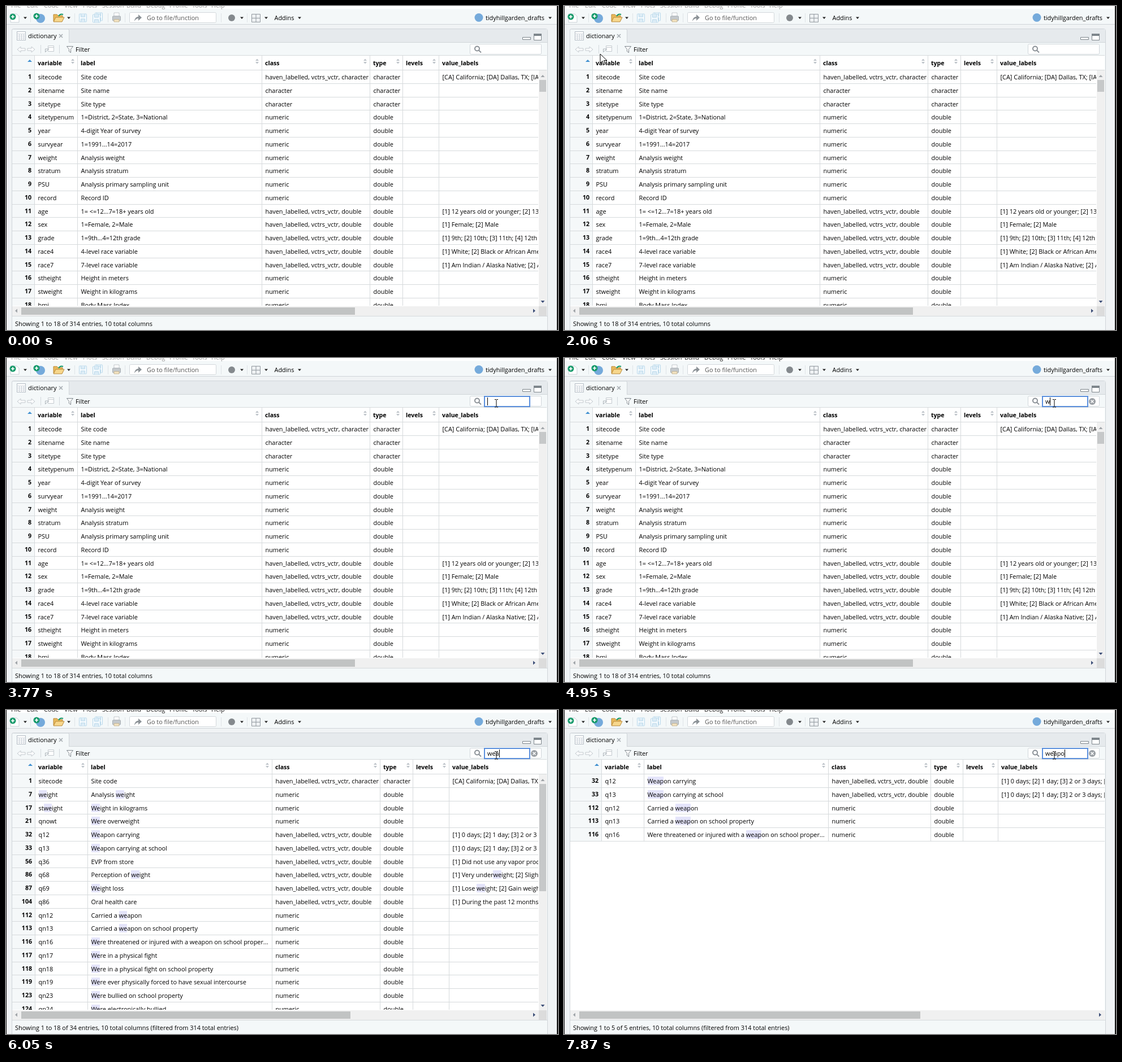
These frames come from a looping animation (976 by 574 pixels, 8 s). An HTML page:

```html
<!DOCTYPE html>
<html lang="en">
<head>
<meta charset="utf-8">
<title>Data viewer search</title>
<style>
html, body { margin: 0; width: 100%; height: 100%; overflow: hidden; background: #f0f3f5; }
#stage { position: relative; width: 976px; height: 574px; overflow: hidden; }
#stage, #stage text { font: 10.9px 'Open Sans', sans-serif; color: #000; }
#stage > svg, .view { position: absolute; left: 0; top: 0; width: 976px; height: 574px; }
.view * { position: absolute; white-space: pre; }
.view mark { position: static; background: #e4e4fa; color: inherit; }
.head { top: 88px; height: 25px; left: 11px; right: 20px; background: #fff; border-bottom: 1px solid #d6dadc; }
.head b, .num { font-weight: 700; font-size: 10.6px; }
.head b { line-height: 27px; }
.body { top: 114px; height: 417px; left: 0; overflow: hidden; }
.row { left: 11px; width: 945px; height: 23.76px; line-height: 23.76px; box-sizing: border-box; border-bottom: 1px solid #d6dadc; }
.gutter { left: 11px; top: 0; background: #f5f8f9; }
.line { top: 0; width: 1px; background: #d6dadc; }
.sort { width: 6px; height: 10px; fill: #bcc2c8; }
.status { left: 16px; top: 555px; line-height: 16px; }
#cursor { animation: move 8s step-end infinite; }
@keyframes move {
  0% { transform: translate(1038px, 807px); }
  3.75% { transform: translate(1038px, 807px); animation-timing-function: steps(3, start); }
  6.56% { transform: translate(393px, 66px); }
  9.5% { transform: translate(393px, 66px); animation-timing-function: steps(10, start); }
  19.2% { transform: translate(40px, 4px); }
  19.25% { transform: translate(17px, 26px); }
  20.125% { transform: translate(17px, 26px); animation-timing-function: steps(4, start); }
  23.875% { transform: translate(92px, 70px); animation-timing-function: steps(3, start); }
  26.69% { transform: translate(64px, 85px); }
  29.625% { transform: translate(64px, 85px); animation-timing-function: steps(4, start); }
  33.45% { transform: translate(400px, 18px); animation-timing-function: steps(4, start); }
  37.25% { transform: translate(784px, 92px); }
  39.375% { transform: translate(784px, 92px); animation-timing-function: steps(7, start); }
  46.1%, 100% { transform: translate(867px, 80px); }
}
</style>
</head>
<body>
<div id="stage">
<svg viewBox="0 0 976 574">
  <defs>
    <path id="drop" d="M-3-1.5h6L0 2z" fill="#222"/>
    <g id="plus"><circle r="5.5" fill="#169a6b"/><path d="M-3 0h6M0-3v6" stroke="#fff" stroke-width="1.7"/></g>
    <g id="disk" fill="#f3f9fd" stroke="#b9d8ea"><rect x="-6.5" y="-7" width="13" height="14" rx="1"/><path d="M-3.5-7v5h7v-5M-3.5 7V2h7v5" fill="#dcecf6"/></g>
    <g id="sheet"><rect width="15" height="15" fill="#fff" stroke="#b4bcc4"/><path d="M0 4h15M0 7.7h15M0 11.4h15M4 4v11M8 4v11M12 4v11" stroke="#ccd3da"/></g>
  </defs>
  <!-- menu and toolbar -->
  <path d="M0 0h976v32H0z" fill="#f4f8f9"/>
  <path d="M0 0h976v5H0z" fill="#fff"/>
  <path d="M30 0h31v6H30z" fill="#d5e8f8" data-show="1458-1540"/>
  <g id="menu"></g>
  <path d="M0 32.5h976" stroke="#d0d5d9"/>
  <path d="M8 14h11l4 4v11H8z" fill="#fff" stroke="#c8cfd4"/>
  <use href="#plus" x="12" y="19"/>
  <circle cx="61" cy="22" r="8" fill="#75aadb"/>
  <use href="#plus" x="54" y="18"/>
  <path d="M84 27V15h6l2 2h8v3" fill="#e9b95b" stroke="#b9893a"/>
  <path d="M84 28l4-8h15l-4 8z" fill="#f7d78c" stroke="#b9893a"/>
  <path d="M93 18q3-5 8-3" fill="none" stroke="#169a6b" stroke-width="2"/>
  <use href="#disk" x="136" y="21"/><use href="#disk" x="164" y="19"/><use href="#disk" x="160" y="22"/>
  <path d="M191 12h9v6h-9z" fill="#fff" stroke="#c2c7cb"/>
  <rect x="188.500" y="18" width="14" height="8" rx="1" fill="#c4c9cd" stroke="#a9afb4"/>
  <path d="M191 24h9v4h-9z" fill="#f6e6c4" stroke="#c5b48f"/>
  <rect x="218.500" y="11.500" width="153" height="18" rx="2" fill="#fff" stroke="#d3d8dc"/>
  <path d="M227 27q1-8 7-8v-4l6 5.500-6 5.500v-4q-4 0-7 5z" fill="#8c9297"/>
  <text x="249" y="25" fill="#555">Go to file/function</text>
  <circle cx="399" cy="21" r="6" fill="#84898d"/>
  <path d="M434.500 14.500h15v14h-15zM442 14.500v14M434.500 21.500h15" fill="#eef1f3" stroke="#92999f"/>
  <text x="474.500" y="25">Addins</text>
  <circle cx="836" cy="20.500" r="7.500" fill="#75aadb"/>
  <text x="848" y="25">tidyhillgarden_drafts</text>
  <use href="#drop" x="34" y="21"/><use href="#drop" x="111" y="21"/><use href="#drop" x="417" y="21"/>
  <use href="#drop" x="460" y="21"/><use href="#drop" x="519" y="21"/><use href="#drop" x="962" y="21"/>
  <path d="M43.500 13v16M121.500 13v16M180.500 13v16M210.500 13v16M380.500 13v16M426.500 13v16" stroke="#dfe4e7"/>
  <!-- pane -->
  <rect x="10.500" y="40.500" width="947" height="540" rx="3" fill="#f4f8f9" stroke="#d0d5d9"/>
  <path d="M11 41h946v24H11z" fill="#e6eaed"/>
  <path d="M11 64.500h946" stroke="#d0d5d9"/>
  <path d="M10.500 65V43q0-2 2-2h97q2 0 2 2v22" fill="#f4f8f9" stroke="#d0d5d9"/>
  <use href="#sheet" x="19.500" y="45.500"/>
  <text x="39" y="57">dictionary</text>
  <path d="M94 50l6 6m0-6l-6 6" stroke="#a7adb2" stroke-width="1.7"/>
  <path d="M913.500 55.500h14v4h-14z" fill="#fff" stroke="#7d858b"/>
  <path d="M933.500 49.500h13v11h-13z" fill="#fff" stroke="#7d858b"/><path d="M933 49h14v4h-14z" fill="#7d858b"/>
  <path d="M20 77l6-5v3h8v4h-8v3zM51 77l-6-5v3h-7v4h7v3z" fill="#fafbfc" stroke="#c4cacf"/>
  <path d="M74.500 70.500h10v10h-10zM74.500 73.500h10" fill="#fff" stroke="#c4cacf"/>
  <path d="M69.500 82v-6h6M70 81l6-5" fill="none" stroke="#aeb5bb"/>
  <path d="M61.500 69v15M94.500 69v15" stroke="#d3d9dd"/>
  <path d="M107.500 71.500h11l-4 5v6l-3-2v-4z" fill="#fff" stroke="#7f878d"/>
  <text x="123" y="80.500">Filter</text>
  <!-- search field -->
  <rect x="820.500" y="67.500" width="126" height="18" rx="2" fill="#fff" stroke="#d0d6da"/>
  <g fill="none" stroke="#8b9197" stroke-width="2"><circle cx="833" cy="75.500" r="4"/><path d="M836 78.500l4 4"/></g>
  <rect x="846" y="68" width="80" height="18" fill="#fff" stroke="#5b8fdc" stroke-width="2" data-show="3770-8000"/>
  <g data-show="4950-8000"><circle cx="934" cy="77" r="6" fill="#9a9fa4"/><path d="M931.500 74.500l5 5m0-5l-5 5" stroke="#fff" stroke-width="1.500"/></g>
  <g id="typed"></g>
  <path d="M11 88h945v461H11z" fill="#fff"/>
  <path d="M11 87.500h945M11 549.500h946" stroke="#d6dadc"/>
  <path d="M0 0h1v574H0zM974 0h2v574h-2z" fill="#111"/>
</svg>
<div id="views"></div>
<svg viewBox="0 0 976 574">
  <g id="cursor">
    <path d="M0 0v16l4-3.500 2.500 6 2.500-1-2.500-6H12z" fill="#fff" stroke="#000" data-show="300-2904,3304-3535"/>
    <path d="M-2 1q2-2 3 0v7l6 1.500q2 .5 2 3v3l-2 6H-1l-6-9q0-3 3-1l2 2z" fill="#fff" stroke="#000" data-show="2904-3304"/>
    <path d="M-3-6.500h2.500M.500-6.500H3M0-6V6.500M-3 7h2.500M.500 7H3" stroke="#000" fill="none" data-show="3535-8000"/>
  </g>
</svg>
</div>
<script>
const LOOP = 8000;
const el = id => document.getElementById(id);

// number | variable | label | kind | value labels
const records = Object.fromEntries(`
1|sitecode|Site code|s|[CA] California; [DA] Dallas, TX; [IA] Iowa
2|sitename|Site name|c|
3|sitetype|Site type|c|
4|sitetypenum|1=District, 2=State, 3=National|n|
5|year|4-digit Year of survey|n|
6|survyear|1=1991...14=2017|n|
7|weight|Analysis weight|n|
8|stratum|Analysis stratum|n|
9|PSU|Analysis primary sampling unit|n|
10|record|Record ID|n|
11|age|1= &lt;=12...7=18+ years old|h|[1] 12 years old or younger; [2] 13 years old
12|sex|1=Female, 2=Male|h|[1] Female; [2] Male
13|grade|1=9th...4=12th grade|h|[1] 9th; [2] 10th; [3] 11th; [4] 12th
14|race4|4-level race variable|h|[1] White; [2] Black or African American
15|race7|7-level race variable|h|[1] Am Indian / Alaska Native; [2] Asian
16|stheight|Height in meters|n|
17|stweight|Weight in kilograms|n|
18|bmi|Body Mass Index|n|
21|qnowt|Were overweight|n|
29|q9|Riding with a drinking driver|h|[1] 0 times; [2] 1 time; [3] 2 or 3 times
32|q12|Weapon carrying|h|[1] 0 days; [2] 1 day; [3] 2 or 3 days; [4] 4 or 5 days
33|q13|Weapon carrying at school|h|[1] 0 days; [2] 1 day; [3] 2 or 3 days; [4] 4 or 5 days
41|q21|Sexual dating violence|h|[1] Did not date or go out with anyone
42|q22|Physical dating violence|h|[1] Did not date or go out with anyone
56|q36|EVP from store|h|[1] Did not use any vapor products
86|q68|Perception of weight|h|[1] Very underweight; [2] Slightly underweight
87|q69|Weight loss|h|[1] Lose weight; [2] Gain weight; [3] Stay
104|q86|Oral health care|h|[1] During the past 12 months; [2] Between
109|qn9|Rode with a drinking driver|n|
112|qn12|Carried a weapon|n|
113|qn13|Carried a weapon on school property|n|
116|qn16|Were threatened or injured with a weapon on school proper...|n|
117|qn17|Were in a physical fight|n|
118|qn18|Were in a physical fight on school property|n|
119|qn19|Were ever physically forced to have sexual intercourse|n|
123|qn23|Were bullied on school property|n|
124|qn24|Were electronically bullied|n|
307|qnsunscreenuse|Mostly or always wear sunscreen|n|`
  .trim().split('\n').map(line => [line.split('|')[0], line.split('|')]));

const labelled = 'haven_labelled, vctrs_vctr, ';
const kinds = {
  s: [labelled + 'character', 'character'],
  c: ['character', 'character'],
  h: [labelled + 'double', 'double'],
  n: ['numeric', 'double']
};
const filtered = ' (filtered from 314 total entries)';
const wide = [51, 144, 470, 661, 719, 783];
const views = [
  { show: '0-5510', edges: [50, 126, 452, 643, 701, 765], total: 314, thumbX: 617, thumbY: 152,
    ids: '1 2 3 4 5 6 7 8 9 10 11 12 13 14 15 16 17 18' },
  { show: '5510-5820', find: 'w', edges: wide, total: 103, thumbX: 609, thumbY: 195,
    ids: '1 7 14 15 17 21 29 32 33 41 42 56 86 87 104 109 112 113' },
  { show: '5820-6360', find: 'we', edges: wide, total: 34, thumbX: 609, thumbY: 321,
    ids: '1 7 17 21 32 33 56 86 87 104 112 113 116 117 118 119 123 124' },
  { show: '6360-7330', find: 'wea', edges: [65, 158, 483, 664, 721, 783], total: 6, thumbX: 630,
    ids: '32 33 112 113 116 307' },
  { show: '7330-8000', find: 'weap', edges: [66, 141, 467, 648, 705, 767], total: 5, thumbX: 630,
    ids: '32 33 112 113 116' }
];
const titles = ['variable', 'label', 'class', 'type', 'levels', 'value_labels'];

const box = (cls, css, html = '') => `<div class="${cls}" style="${css}">${html}</div>`;

function scrollbars({ thumbX, thumbY }) {
  const right = thumbY ? 942 : 956, tip = right - 11;
  const vertical = thumbY ? `<path d="M942 114h14v418h-14z" fill="#f0f0f0"/>
    <path d="M943 131h12V${thumbY}h-12z" fill="#c6c8c9"/>
    <path d="M945.500 126l3.500-4 3.500 4z" fill="#a0a4a8"/><path d="M945.500 522h7l-3.500 4z" fill="#3d4f78"/>
    <path d="M942 532h14v17h-14z" fill="#dcdcdc"/>` : '';
  return `<svg width="976" height="574" style="left:0;top:0">
    <path d="M11 532H${right}v17H11z" fill="#f0f0f0"/><path d="M27 534H${thumbX}v13H27z" fill="#c1c3c3"/>
    <path d="M20 536.500v7l-4-3.500z" fill="#a0a4a8"/><path d="M${tip + 1} 536.500v7l4-3.500z" fill="#3d4f78"/>
    ${vertical}</svg>`;
}

function tableView(view) {
  const { show, find, edges, total, thumbY } = view;
  const ids = view.ids.split(' ');
  const first = edges[0];
  const match = find && new RegExp(find, 'i');
  const tag = s => match ? s.replace(match, '<mark>$&</mark>') : s;
  const lines = height => edges.map(x => box('line', `left:${x}px;height:${height}px`)).join('');

  const rows = ids.map((id, i) => {
    const [, name, label, kind, values] = records[id];
    const cells = [name, label, ...kinds[kind], '', values];
    return box('row', `top:${i * 23.76}px`,
      `<span class="num" style="right:${956 - first + 5}px">${id}</span>` +
      cells.map((s, c) => `<span style="left:${edges[c] - 4.5}px">${tag(s)}</span>`).join(''));
  }).join('');

  const heads = titles.map((s, c) => `<b style="left:${edges[c] - 5}px">${s}</b>` +
    (c < 5 ? `<svg class="sort" style="left:${edges[c + 1] - 22}px;top:5px"><path d="M0 4l3-3.500L6 4zM0 6h6L3 9.500z"/></svg>` : '')).join('');
  const arrow = `<svg class="sort" style="left:${first - 23}px;top:6px;width:8px;fill:#3f8fd0"><path d="M0 5l4-4 4 4z"/></svg>`;

  return `<div class="view" data-show="${show}">` +
    box('head', '', box('gutter', `left:0;width:${first - 11}px;height:25px`) + heads + arrow) +
    box('', 'left:0;top:88px', lines(25)) +
    box('body', `width:${thumbY ? 941 : 956}px`,
      box('gutter', `width:${first - 11}px;height:${ids.length * 23.76}px`) + rows + lines(ids.length * 23.76)) +
    scrollbars(view) +
    box('status', '', `Showing 1 to ${ids.length} of ${total} entries, 10 total columns${find ? filtered : ''}`) +
    '</div>';
}
el('views').innerHTML = views.map(tableView).join('');

// the menu text darkens once the window is focused
const menu = [['File', 9], ['Edit', 37], ['Code', 67], ['View', 103], ['Plots', 136], ['Session', 170],
  ['Build', 213], ['Debug', 248], ['Profile', 289], ['Tools', 329], ['Help', 363]]
  .map(([s, x]) => `<text x="${x}" y="3">${s}</text>`).join('');
el('menu').innerHTML = `<g fill="#999" data-show="0-3850">${menu}</g><g fill="#222" data-show="3850-8000">${menu}</g>`;

// typed text, start, end, time the caret blinks off
const typing = [['', 3770, 4710, 4340], ['w', 4710, 5510, 5510], ['we', 5510, 6050, 6050],
  ['wea', 6050, 7020, 6590], ['weap', 7020, 7870, 7560], ['weapo', 7870, 8000, 8000]];
el('typed').innerHTML = typing.map(([s, from, to]) =>
  `<text x="851" y="81" data-show="${from}-${to}">${s}</text>`).join('');
[...el('typed').children].forEach((text, i) => {
  const [, from, , off] = typing[i];
  const x = Math.round(851 + text.getComputedTextLength());
  el('typed').insertAdjacentHTML('beforeend',
    `<rect x="${x}" y="70" width="1" height="14" data-show="${from}-${off}"/>`);
});

// turn each data-show list of time spans into stepped keyframes
const sheet = document.createElement('style');
document.querySelectorAll('[data-show]').forEach((node, i) => {
  const steps = node.dataset.show.split(',').map(span => {
    const [from, to] = span.split('-').map(ms => ms / LOOP * 100);
    return `${from}%{visibility:visible}${to}%{visibility:hidden}`;
  }).join('');
  sheet.textContent += `@keyframes show${i}{0%{visibility:hidden}${steps}}`;
  node.style.animation = `show${i} ${LOOP}ms step-end infinite`;
});
document.head.append(sheet);
</script>
</body>
</html>
```
